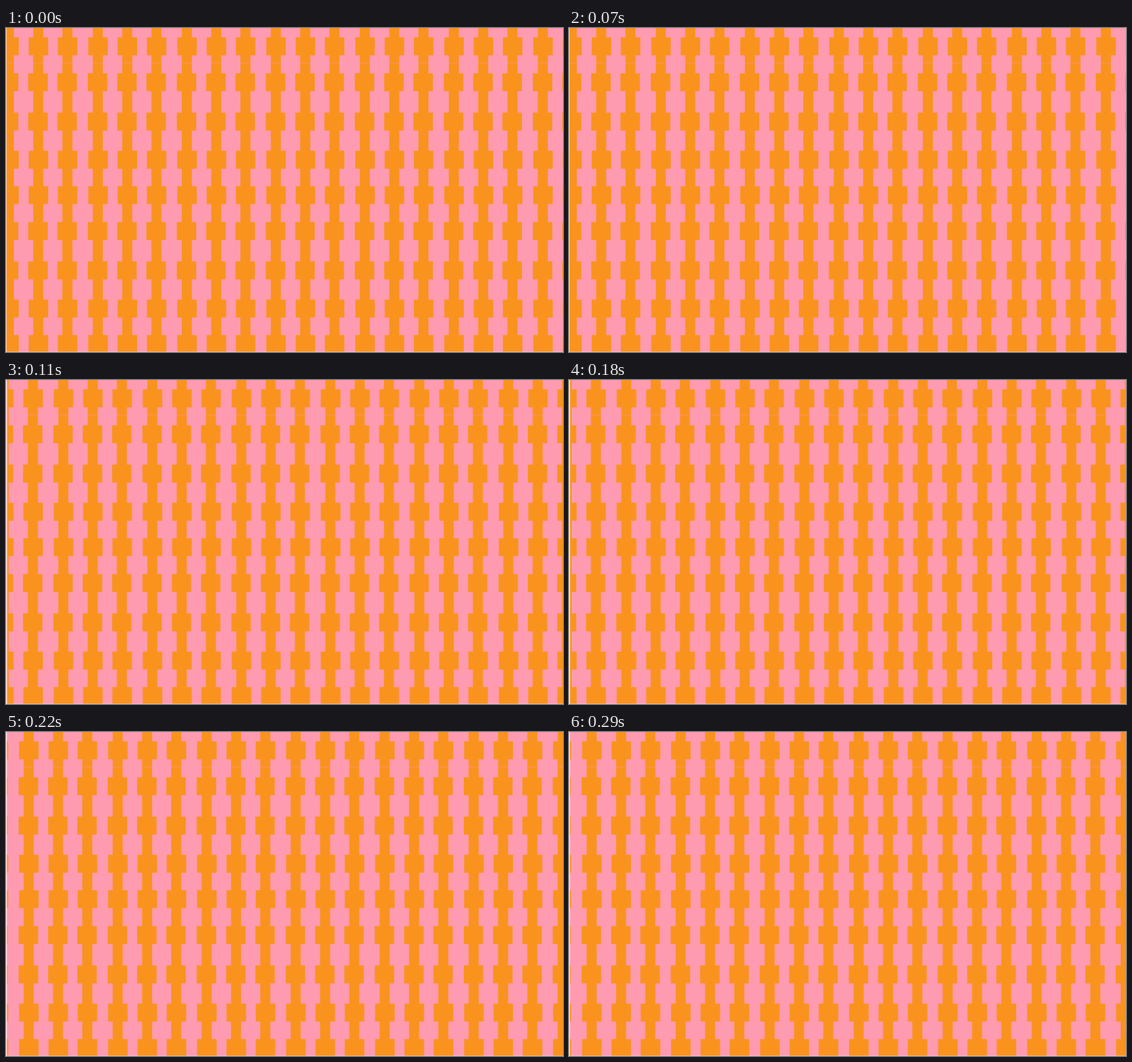
An HTML page without scripts that plays this animation: 960 px wide and 560 px high, repeating every 330 ms.

```html
<!DOCTYPE html>
<html lang="en">
<head>
<meta charset="utf-8">
<title>Beaded stripes</title>
<style>
  html, body { margin: 0; width: 100%; height: 100%; overflow: hidden; background: #ff9bb0; }
  svg { display: block; width: 960px; height: 560px; }
  .beads { fill: #f9931e; animation: slide 330ms step-end infinite; }
  .edge { fill: #ffdfe6; animation: edge 330ms step-end infinite; }
  @keyframes slide {
    0% { transform: translateX(0); }
    33.333% { transform: translateX(-59.5px); }
    66.667% { transform: translateX(-119.2px); }
  }
  @keyframes edge {
    0% { transform: scaleX(.5); }
    33.333% { transform: scaleX(.9); }
    66.667% { transform: scaleX(.8); }
  }
</style>
</head>
<body>
<svg viewBox="0 0 960 560">
  <defs>
    <path id="square" d="M0 0h33.6v31h-33.6z"/>
    <!-- one string of beads -->
    <g id="string">
      <path d="M0 0h17.3v560h-17.3z"/>
      <use href="#square" x="-7.8" y="16.3"/>
      <use href="#square" x="-8.6" y="78.3"/>
      <use href="#square" x="-8.6" y="146.2"/>
      <use href="#square" x="-7.8" y="212.2"/>
      <use href="#square" x="-7.8" y="273.6"/>
      <use href="#square" x="-8.6" y="335.6"/>
      <use href="#square" x="-8.6" y="403.4"/>
      <use href="#square" x="-7.8" y="469.4"/>
      <use href="#square" x="-7.8" y="530.8"/>
    </g>
    <g id="trio">
      <use href="#string"/>
      <use href="#string" x="50.3"/>
      <use href="#string" x="102.7"/>
    </g>
    <g id="pair">
      <use href="#trio"/>
      <use href="#trio" x="153.4"/>
    </g>
  </defs>
  <rect width="960" height="560" fill="#ff9bb0"/>
  <g class="beads">
    <use href="#pair" x="-106.5"/>
    <use href="#pair" x="200.3"/>
    <use href="#pair" x="507.1"/>
    <use href="#pair" x="813.9"/>
  </g>
  <!-- thin seams -->
  <rect y="60" width="960" height="1" fill="#ff9bb0" opacity=".5"/>
  <rect y="559" width="960" height="1" fill="#ffdfe6" opacity=".5"/>
  <rect class="edge" width="2" height="560"/>
</svg>
</body>
</html>
```
